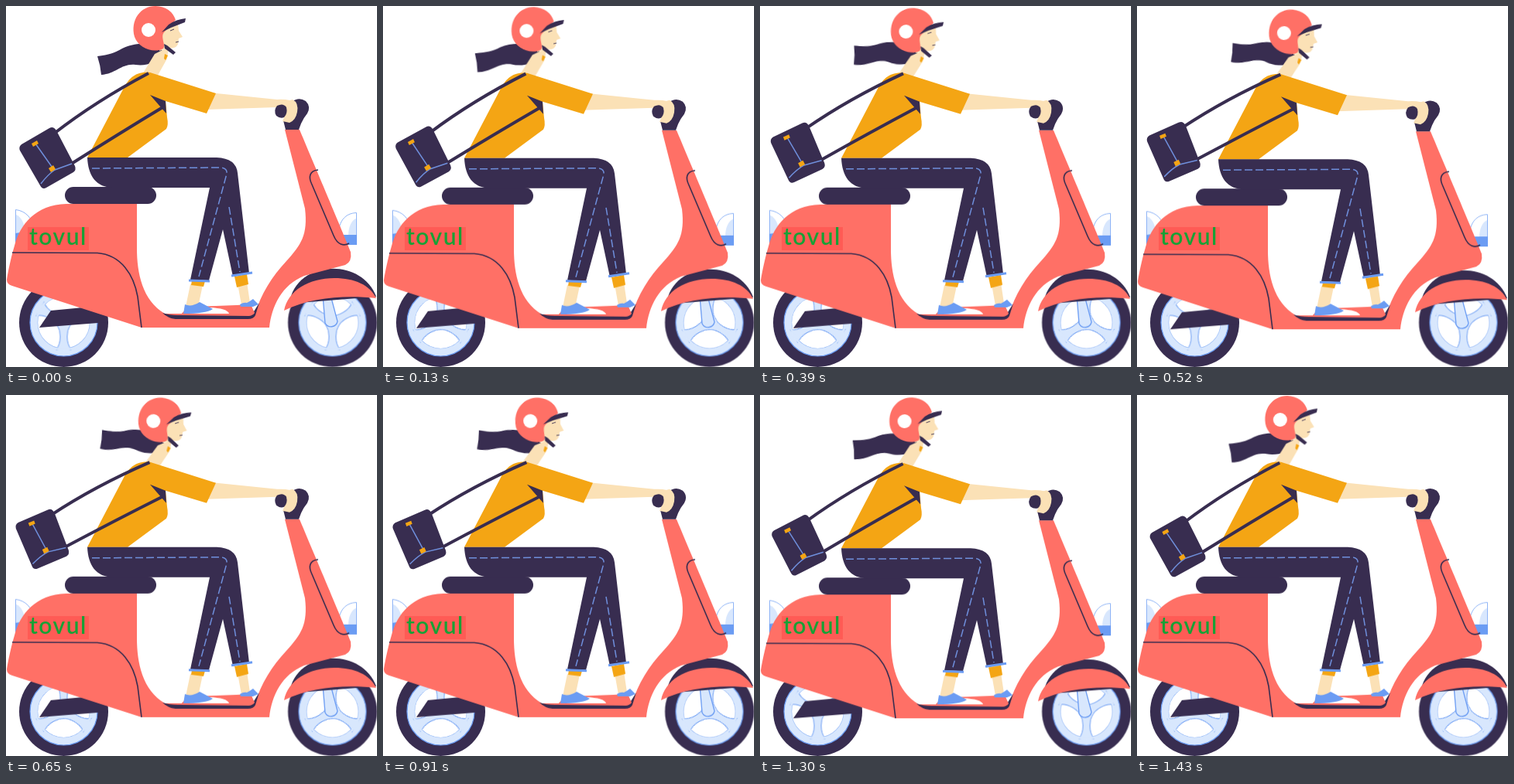
Recreate the animation shown at these times as an HTML page without scripts. Size 479x467 px, loop 1.56 s.

```html
<!DOCTYPE html>
<html lang="en">
<head>
<meta charset="utf-8">
<title>Scooter ride</title>
<style>
  @property --bob { syntax: "<number>"; inherits: true; initial-value: 0; }
  @property --sway { syntax: "<number>"; inherits: true; initial-value: 0; }

  html, body { margin: 0; width: 100%; height: 100%; overflow: hidden; background: #fff; }
  svg {
    display: block; width: 100vw; height: 100vh;
    animation: bob 1.56s step-end infinite, sway 1.56s step-end infinite;
  }

  .coral { fill: #ff7066; }
  .dark { fill: #382d50; }
  .amber { fill: #f4a514; }
  .skin { fill: #fbe1b6; }
  .blue { fill: #6b9cf3; }
  .pale { fill: #d8e7fd; }
  .line { fill: none; stroke: #382d50; stroke-width: 1.6; }
  .thin { fill: none; stroke: #382d50; stroke-width: .9; }
  .seam { fill: none; stroke: #6f8fdc; stroke-width: 1.5; }
  .strap { fill: none; stroke: #382d50; stroke-width: 4; }
  .glass { fill: #fff; stroke: #8fb4f6; stroke-width: 1; }
  .rim { fill: #fff; stroke: #6b9cf3; stroke-width: 1.2; }
  .brand { font: 600 30px Lato, "Open Sans", sans-serif; fill: #18a136; letter-spacing: 1.5px; }

  /* Shared motion: one bounce and one slow sway drive every part. */
  .ride { transform: translateY(calc(var(--bob) * 1px)); }
  .head {
    transform-origin: 192px 60px;
    transform: translate(calc(var(--sway) * 4px), calc(var(--sway) * 2.5px)) rotate(calc(var(--sway) * 4.5deg));
  }
  .hair { transform-origin: 192px 60px; transform: rotate(calc(var(--sway) * 13.5deg)); }
  .sling { transform-origin: 193px 105px; transform: rotate(calc(var(--sway) * 4.4deg)); }
  .bag { transform-origin: 53px 197px; transform: rotate(calc(var(--sway) * 2.5deg)); }
  .spin { animation: spin .26s steps(2) infinite; }

  @keyframes spin { to { transform: rotate(120deg); } }
  @keyframes bob {
    0% { --bob: 0; }
    8.333%, 25%, 41.666%, 58.333%, 75%, 91.666% { --bob: .8; }
    16.666%, 33.333%, 50%, 66.666%, 83.333% { --bob: 2.2; }
  }
  @keyframes sway {
    0% { --sway: 0; }
    8.333% { --sway: .22; }
    16.666% { --sway: .44; }
    25% { --sway: .7; }
    33.333% { --sway: .93; }
    41.666% { --sway: 1; }
    58.333% { --sway: .98; }
    66.666% { --sway: .83; }
    75% { --sway: .62; }
    83.333% { --sway: .41; }
    91.666% { --sway: .13; }
  }
</style>
</head>
<body>
<svg viewBox="0 0 479 467" preserveAspectRatio="none">
  <defs>
    <g id="tyre">
      <circle r="57.5" class="dark"/>
      <circle r="43.500" class="pale" stroke="#6b9cf3" stroke-width="1.2"/>
      <circle r="34" class="rim"/>
    </g>
    <path id="spoke" class="pale" stroke="#6b9cf3" d="M-8 4Q-4.500 10 -4.500 18Q-4.500 29 -10 35H10Q4.500 29 4.500 18Q4.500 10 8 4Z"/>
    <g id="spokes">
      <use href="#spoke"/>
      <use href="#spoke" transform="rotate(120)"/>
      <use href="#spoke" transform="rotate(240)"/>
      <circle r="35" fill="none" stroke="#d8e7fd" stroke-width="3"/>
      <circle r="9" class="pale"/>
    </g>
  </defs>

  <g transform="translate(74.5 409.5)">
    <use href="#tyre"/>
    <g class="spin"><use href="#spokes"/></g>
  </g>

  <g transform="translate(421.5 409.5)">
    <use href="#tyre"/>
    <g class="spin"><use href="#spokes"/></g>
  </g>

  <g class="ride">
    <!-- Front fork and fender -->
    <path class="pale" stroke="#6b9cf3" stroke-width="1.3" d="M409 375L412 410A8.500 8.500 0 0 0 428 408L419 374Z"/>
    <path class="dark" d="M366 385C372 330 458 323 478 376Z"/>
    <path class="coral" d="M359 394C364 368 391 352 424 352C450 352 470 361 478 378C440 374 395 376 359 394Z"/>

    <!-- Lamps -->
    <path class="glass" d="M12.500 263.500C25 265 34 274 36 288L12.500 305Z"/>
    <path class="pale" d="M13 270C20 273 24 281 24 292L13 295Z"/>
    <path class="blue" d="M12 294L30 291L23 302L12 306Z"/>
    <path class="glass" d="M452.500 267.500C438 268 430 278 429 295L452.500 302Z"/>
    <path class="pale" d="M452 275C446 277 442 286 442 297H452Z"/>
    <path class="blue" d="M434 296H453V309H440Z"/>

    <path class="dark" d="M43 416L58 394L131 387V409Z"/>

    <!-- Scooter shell -->
    <path class="coral" d="M169 256H78C38 257 18 283 11 310C6 327 3 342 1 354Q1 360 8 362L175 416H340C343 388 356 361 385 349L438 335Q447 331 445 318C441 307 405 222 379 160H360L386 262C390 296 381 309 362 330C344 349 328 374 322 398H205C176 381 169 345 169 314Z"/>
    <path class="dark" d="M202 397Q211 400 222 400H317L327 384L322 400Q320 405 312 405H219Q209 404 202 397Z"/>
    <path class="coral" d="M225 400L235 389Q280 388 316 386L321 397Q319 400 314 401Z"/>
    <path class="line" d="M8 319L118 319.500C149 322 165 348 170 376L175 416"/>
    <path class="line" d="M403 212C392 213 390 221 395 231L423 297C428 309 436 311 443 307"/>
    <rect class="dark" x="76" y="234" width="118" height="22" rx="11"/>

    <!-- Feet -->
    <path class="skin" d="M299 359L311 357L315 384L304 387Z"/>
    <path class="amber" d="M295 350L311 347L313 360L298 364Z"/>
    <path class="blue" d="M302 386Q307 383 311 384Q315 382 319 379L326 386L319 389H303Z"/>
    <path class="skin" d="M238 360L254 361L248 389L232 389Z"/>
    <path class="amber" d="M240 355L257 356L255 363L239 361Z"/>
    <path fill="#fff" d="M230 394L262 390Q286 391 288 398H230Z"/>
    <path class="blue" d="M231 386Q239 390 250 383L267 392Q258 398 229 398Z"/>

    <!-- Head -->
    <g class="head">
      <path class="dark hair" d="M118 65C133 63 140 61 150 55C166 47 182 48 192 52L206 60C196 74 180 78 167 76C149 74 142 88 123 89Q122 77 118 65Z"/>
      <path class="skin" d="M192 62L210 53L208 68L193 95L175 90Z"/>
      <path class="skin" d="M202 32L222 22L223 32L228 40L223 42L222 49Q220 56 210 54L198 58Z"/>
      <path class="coral" d="M205 33C198 39 207 50 203 55C190 62 171 54 166 40C160 18 174 0 193 0Q213 1 219 18Z"/>
      <path class="dark" d="M201 34L210 24Q220 17 232 16L231 21L213 28Z"/>
      <path class="dark" d="M204 49L208 51L219 60L216 63L205 55Z"/>
      <path class="thin" d="M212 32L217 30M219 47L223 46"/>
      <path class="amber" d="M205 62L209 64L206 70L204 68Z"/>
      <circle cx="184" cy="31" r="9" fill="#fff"/>
    </g>

    <!-- Torso and arm -->
    <path class="skin" d="M262 112L350 121Q367 120 375 126L370 134L350 131L258 134Z"/>
    <path class="amber" d="M186 86C167 84 158 94 151 108L105 196H157L207 159Q210 154 208 144L206 123L259 139L271 113Z"/>
    <path class="dark" d="M186 115L206 123L207 139L199 130Z"/>

    <!-- Handlebar and hand -->
    <path class="dark" d="M369 124Q378 117 387 123Q394 130 389 139Q384 145 381 152L378 160H361L358 148Z"/>
    <path class="skin" d="M355 125L370 121Q378 125 376 137Q374 148 366 151L357 149Q363 139 355 125Z"/>
    <path class="dark" d="M350 129Q358 125 362 131Q364 139 359 144Q354 146 349 142Q345 135 350 129Z"/>

    <!-- Legs -->
    <path class="dark" d="M105 196H272Q297 197 299 216L314 346L293 350L280 289L262 355L238 354L263 235H139C116 235 106 219 105 196Z"/>
    <path class="seam" stroke-dasharray="10 4" d="M111 210L276 209Q286 209 285 217L249 350M288 260L302 344"/>
    <path fill="none" stroke="#6b9cf3" stroke-width="3" d="M236 355L263 356M291 349L318 345"/>

    <!-- Bag -->
    <g class="sling">
      <path class="strap" d="M184 87Q116 123 62 165M204 130Q146 165 83 205"/>
      <g class="bag">
        <path class="dark" d="M20 179L56 158Q61 155 65 161L89 207Q91 212 87 215L52 235Q47 238 44 232L18 187Q16 182 20 179Z"/>
        <path class="seam" d="M38 178L62 212M45 230C51 222 57 216 63 212L85 204"/>
        <path class="amber" d="M33 178L40 174L42 178L35 182ZM55 210L61 206L64 211L58 215Z"/>
      </g>
    </g>
  </g>

  <!-- Side plate -->
  <rect x="28" y="286" width="79" height="30" fill="#ff5b55"/>
  <text class="brand" x="30" y="309">tovul</text>
</svg>
</body>
</html>
```
